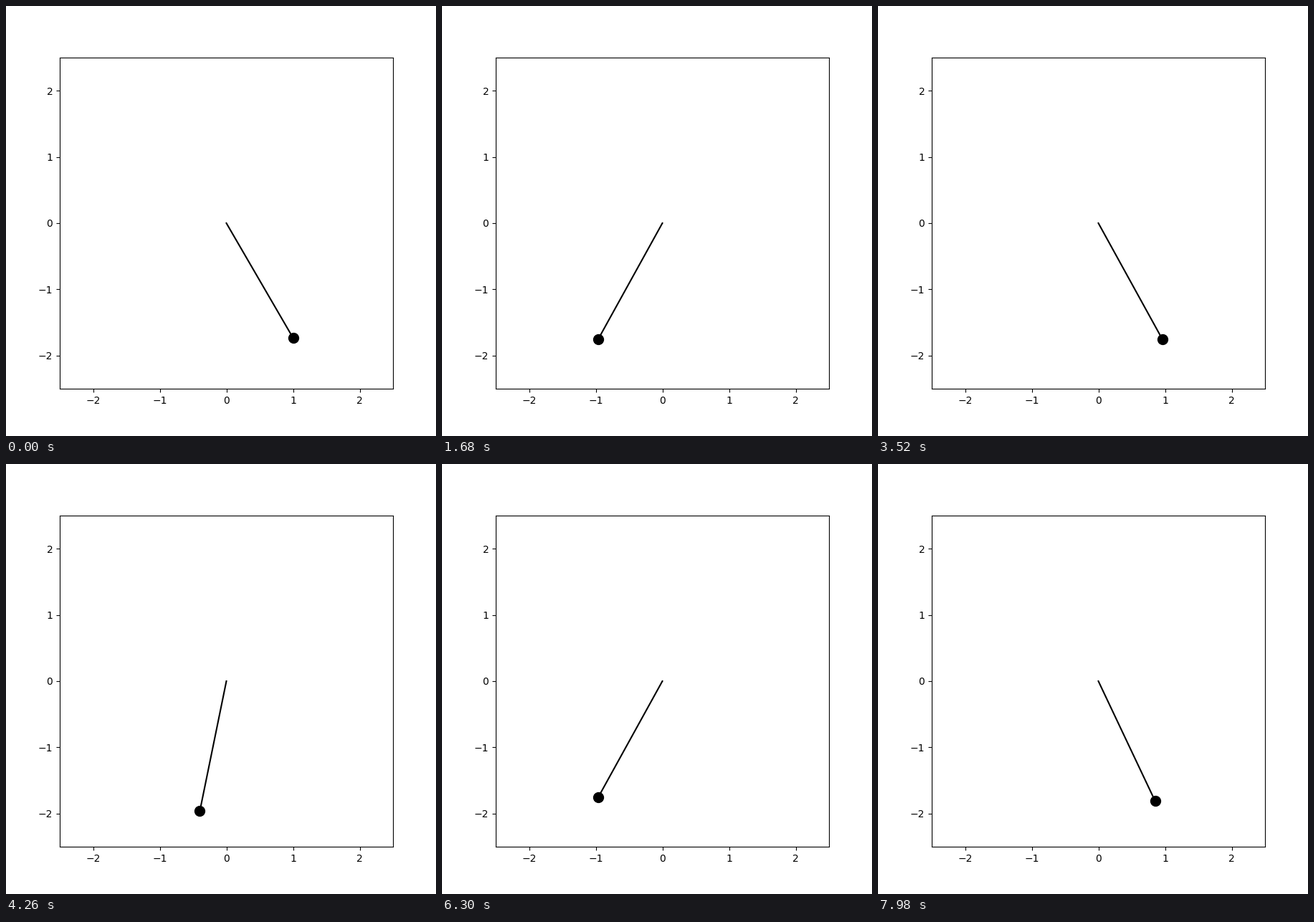
Write a matplotlib script that moves like this. It is 600 px wide and 600 px high and loops after 8 s.

```python
import numpy as np
import matplotlib.pyplot as plt
from matplotlib.animation import FuncAnimation

G, LENGTH = 9.8, 2.0
FRAMES, INTERVAL = 400, 20
DT, SUBSTEPS = 0.05, 10


def deriv(state):
    theta, omega = state
    return np.array([omega, -G / LENGTH * np.sin(theta)])


def rk4(state, h):
    k1 = deriv(state)
    k2 = deriv(state + h / 2 * k1)
    k3 = deriv(state + h / 2 * k2)
    k4 = deriv(state + h * k3)
    return state + h / 6 * (k1 + 2 * k2 + 2 * k3 + k4)


def swing():
    """Pendulum angle for every frame, released at rest from 30 degrees."""
    state = np.array([np.pi / 6, 0.0])
    angles = []
    for _ in range(FRAMES):
        angles.append(state[0])
        for _ in range(SUBSTEPS):
            state = rk4(state, DT / SUBSTEPS)
    return np.array(angles)


theta = swing()
xs, ys = LENGTH * np.sin(theta), -LENGTH * np.cos(theta)

fig, ax = plt.subplots(figsize=(6, 6), dpi=100)
ax.set_xlim(-2.5, 2.5)
ax.set_ylim(-2.5, 2.5)
rod, = ax.plot([], [], "k-", lw=1.5)
bob, = ax.plot([], [], "ko", ms=10)


def update(i):
    rod.set_data([0, xs[i]], [0, ys[i]])
    bob.set_data([xs[i]], [ys[i]])
    return rod, bob


anim = FuncAnimation(fig, update, frames=FRAMES, interval=INTERVAL,
                     repeat=True, repeat_delay=0)
plt.show()
```
